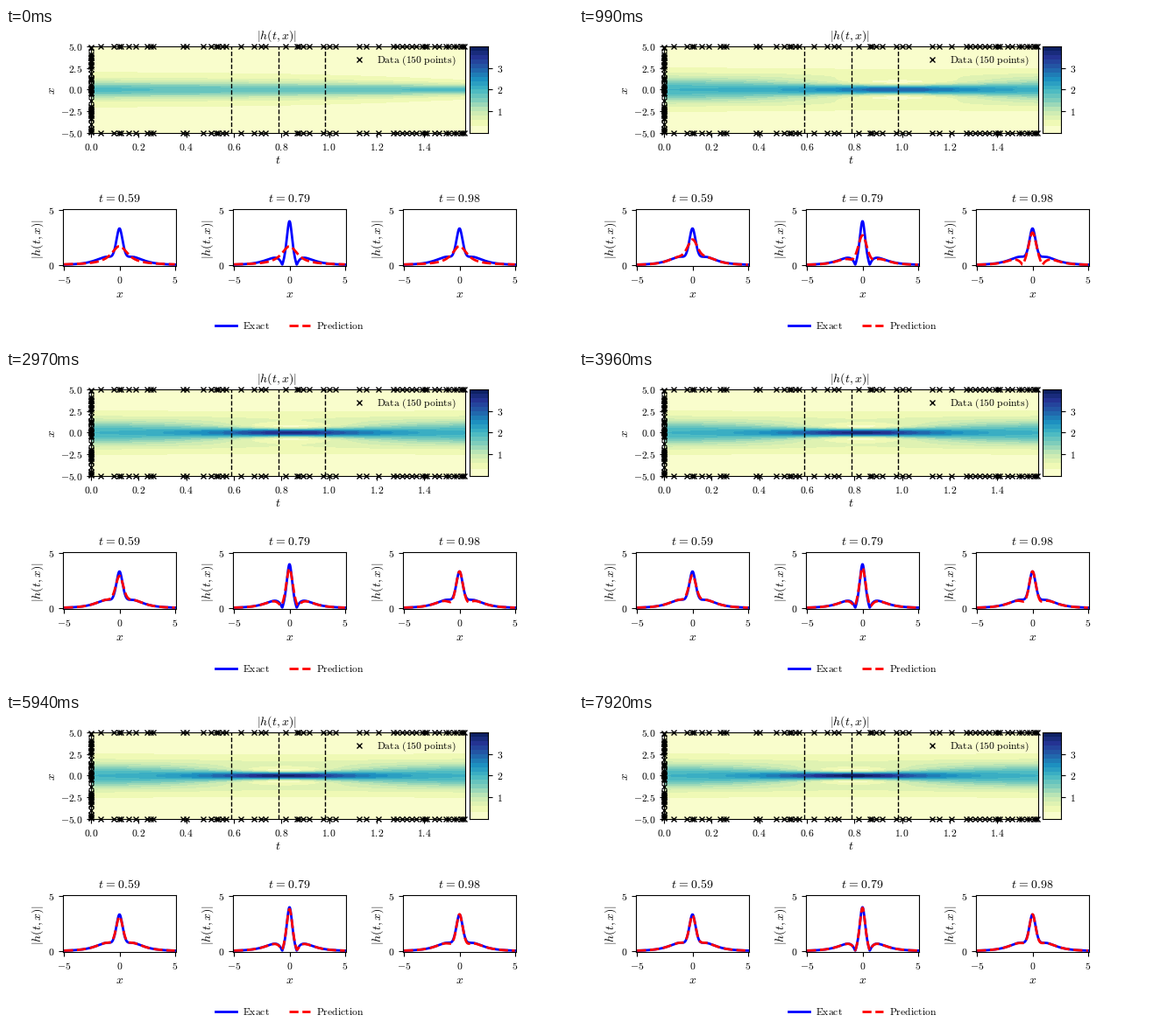
A matplotlib script for the animation above (8000 ms loop, 647 by 360 pixels).

```python
import numpy as np
import matplotlib.pyplot as plt
from matplotlib.animation import FuncAnimation

W, H, DPI = 647, 360, 100
LOOP, TICK, HOLD = 8000, 40, 330
STEPS = 25
END = np.pi / 2
LEFT, TOP, RIGHT, BOTTOM = 97, 21, 523.8, 120
CUTS = [0.589, 0.787, 0.982]
SMALL, BIG = 8.4, 10

plt.rcParams["mathtext.fontset"] = "cm"
fig = plt.figure(figsize=(W / DPI, H / DPI), dpi=DPI, facecolor="white")


def breather(t, x):
    """Modulus of the two-soliton Schroedinger solution with h(0, x) = 2 sech x."""
    top = np.abs(np.cosh(3 * x) + 3 * np.exp(4j * t) * np.cosh(x))
    return 4 * top / (np.cosh(4 * x) + 4 * np.cosh(2 * x) + 3 * np.cos(4 * t))


def untrained(t, x):
    """First guess: a low bell with long tails, narrower towards the end."""
    peak = 1.9 - 0.2 * np.sin(2 * t)
    rate = 1.08 + 0.9 * (t / END) ** 4
    return peak / (1 + (rate * x) ** 2)


def prediction(step, t, x):
    """Network output: a late, low, wide breather that closes in on the exact one."""
    knots = [3, 5, 9, 14, 18, 24]
    focus = np.interp(step, knots, [0.98, 0.89, 0.84, 0.82, 0.81, 0.795])
    loss = np.interp(step, knots, [0.26, 0.175, 0.09, 0.06, 0.04, 0.015])
    spread = np.interp(step, knots, [0.45, 0.32, 0.18, 0.09, 0.05, 0.015])
    mix = np.interp(step, [0, 1, 2, 3], [1, 0.55, 0.2, 0])
    phase = t * np.pi / 4 / focus
    bump = np.sin(2 * phase) ** 2
    wide = 1 + spread * bump * np.exp(-(x / 2) ** 2)
    trained = (1 - loss * bump) * breather(phase, x / wide)
    return mix * untrained(t, x) + (1 - mix) * trained


def box(left, top, right, bottom):
    return fig.add_axes([left / W, 1 - bottom / H, (right - left) / W, (bottom - top) / H])


def label(x, y, s, size=BIG, **kw):
    kw = {"ha": "center", "va": "baseline", **kw}
    fig.text(x / W, 1 - y / H, s, fontsize=size, **kw)


def math_ticks(axis, values, form):
    axis.set_ticks(values, ["$" + form.format(v) + "$" for v in values], fontsize=SMALL)


def to_time(px):
    return (np.asarray(px) - LEFT) / (RIGHT - LEFT) * END


# Heat map
ax = box(LEFT, TOP, RIGHT, BOTTOM)
ax.set(xlim=(0, END), ylim=(-5, 5))
math_ticks(ax.xaxis, np.arange(0, 1.5, 0.2), "{:.1f}")
math_ticks(ax.yaxis, [-5, -2.5, 0, 2.5, 5], "{:.1f}")
label(309, 13, "$|h(t,x)|$")
label(310, 155, "$t$")
label(52, 71, "$x$", rotation=90, va="center")

levels = np.r_[0, 0.33, np.linspace(0.6, 4, 18)]
tt, xx = np.meshgrid(np.linspace(0, END, 121), np.linspace(-5, 5, 201))
fields = [
    ax.contourf(tt, xx, np.clip(prediction(k, tt, xx), 0, 3.999), levels,
                cmap="YlGnBu", vmin=0, vmax=4, zorder=0)
    for k in range(STEPS)
]
ax.vlines(CUTS, -5, 5, colors="k", linewidth=1, linestyles="--")

# Training points: initial condition and both boundaries
edge_px = [108, 123, 129, 131, 140, 148, 161, 165, 168, 202, 206, 225, 234, 240, 242,
           247, 251, 268, 283, 291, 296, 319, 332, 334, 339, 346, 362, 369, 376, 403, 411,
           425, 442, 446, 452, 457, 463, 468, 475, 478, 480, 489, 494, 502, 505, 511,
           514, 519, 521, 523]
edge_t = to_time(edge_px)
start_x = np.random.default_rng(7).uniform(-4.9, 4.9, 50)
cross = dict(color="k", marker="x", markersize=4, linestyle="none", clip_on=False, zorder=5)
ax.plot(np.zeros_like(start_x), start_x, **cross)
for side in (-5, 5):
    ax.plot(edge_t, np.full_like(edge_t, side), **cross)
ax.plot([to_time(403)], [3.5], **cross)
label(423, 40, r"$\mathrm{Data\ (150\ points)}$", SMALL, ha="left")

# Colour bar
bar = box(529, TOP, 550, BOTTOM)
bar.pcolormesh([0, 1], levels, ((levels[:-1] + levels[1:]) / 2)[:, None],
               cmap="YlGnBu", vmin=0, vmax=4)
bar.set_xticks([])
bar.yaxis.tick_right()
math_ticks(bar.yaxis, [1, 2, 3], "{}")

# Cuts at fixed times
xs = np.linspace(-5, 5, 256)
curves = []
for i, t in enumerate(CUTS):
    left = 65 + 194 * i
    cut = box(left, 207, left + 129, 272)
    cut.set(xlim=(-5.1, 5.1), ylim=(-0.1, 5.1))
    math_ticks(cut.xaxis, [-5, 0, 5], "{}")
    math_ticks(cut.yaxis, [0, 5], "{}")
    cut.plot(xs, breather(t, xs), "b-", linewidth=2)
    curves += cut.plot(xs, prediction(0, t, xs), "r--", linewidth=2)
    mid = left + 64.5
    label(mid - 0.5, 199, rf"$t\hspace{{0.08}}=\hspace{{0.08}}{t:.2f}$")
    label(mid, 308, "$x$")
    label(left - 29, 241, "$|h(t,x)|$", rotation=90, va="center")

# Shared legend
for x, style, name in [(239.3, "b-", "Exact"), (322.8, "r--", "Prediction")]:
    fig.add_artist(plt.Line2D([x / W, (x + 24) / W], [1 - 340 / H] * 2, color=style[0],
                              linestyle=style[1:], linewidth=2))
    label(x + 31.2, 344.5, rf"$\mathrm{{{name}}}$", SMALL, ha="left")


def update(frame):
    step = min((frame + 1) * TICK // HOLD, STEPS - 1)
    for k, field in enumerate(fields):
        field.set_visible(k == step)
    for t, curve in zip(CUTS, curves):
        curve.set_ydata(prediction(step, t, xs))
    return [fields[step], *curves]


anim = FuncAnimation(fig, update, frames=LOOP // TICK, interval=TICK,
                     init_func=lambda: update(0), repeat=True, repeat_delay=0)
plt.show()
```
